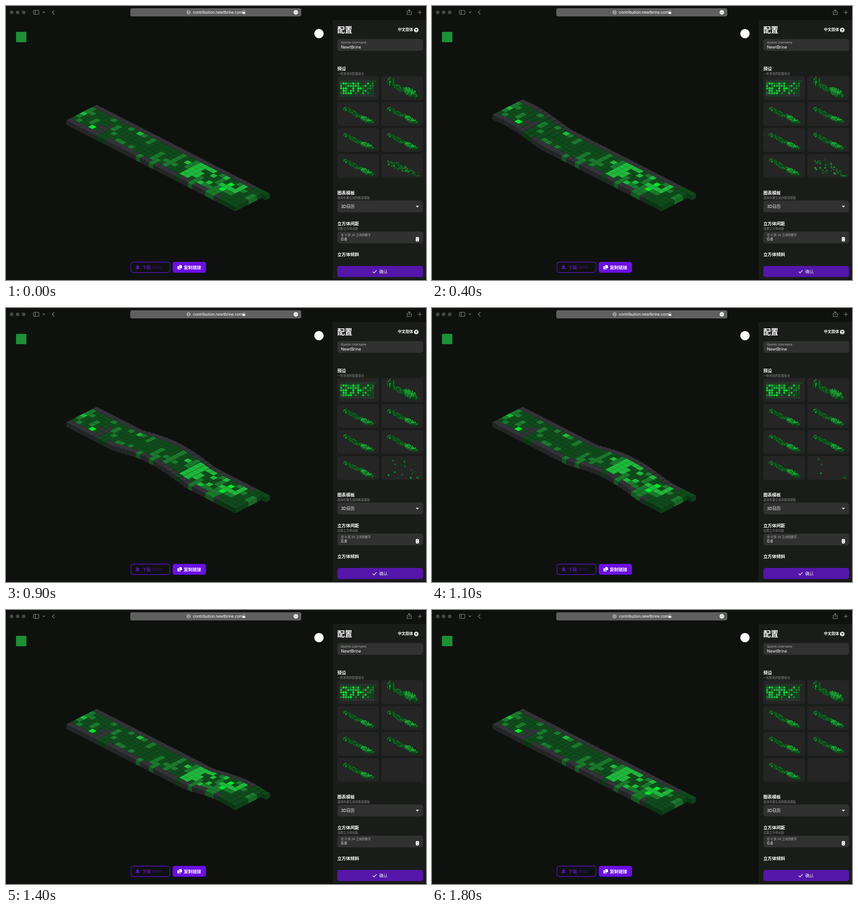
Animation, 926 px wide and 605 px high, one loop 1900 ms. Source, as an HTML page with a canvas:

```html
<!DOCTYPE html>
<html lang="zh">
<head>
<meta charset="utf-8">
<title>3D calendar</title>
<style>
  html, body { margin: 0; width: 926px; height: 605px; overflow: hidden; background: #0f110f; }
  svg, canvas { position: absolute; left: 0; top: 0; }
  text { font-family: Inter, "Noto Sans CJK SC", "Noto Sans CJK", sans-serif; font-size: 9px; fill: #fff; }
  .bold { font-size: 9.6px; font-weight: 700; }
  .note { font-size: 6.55px; fill: #8b8b8b; }
  .label { font-size: 6.6px; fill: #b4b4b4; }
  .field { fill: #303130; }
  .line { fill: none; stroke: #858685; stroke-width: 1.2; }
</style>
</head>
<body>
<svg width="926" height="605" viewBox="0 0 926 605">
  <!-- browser bar -->
  <g fill="#464746"><circle cx="12.5" cy="14" r="4"/><circle cx="25.7" cy="14" r="4"/><circle cx="39" cy="14" r="4"/></g>
  <g class="line">
    <rect x="60.5" y="9.5" width="12" height="9" rx="1.5"/><path d="M64.5 9.5v9M81 12.500l2.500 2.500 2.500-2.500M106.500 9.500l-4.500 4.500 4.500 4.500"/>
    <path d="M886.500 12h-2v7h9v-7h-2M889 16V8m-2.500 2.500L889 8l2.500 2.500M908 14h9m-4.500-4.500v9"/>
  </g>
  <rect x="274" y="5" width="377" height="18" rx="4" fill="#5e5f5e"/>
  <g fill="none" stroke="#ddd" stroke-width=".7">
    <circle cx="402.500" cy="14" r="4"/><ellipse cx="402.500" cy="14" rx="1.800" ry="4"/><path d="M398.500 14h8"/>
    <path d="M522.500 13v-1.500a2 2 0 0 1 4 0V13"/>
  </g>
  <text x="412" y="17.400" style="font-family:Roboto,sans-serif">contribution.newtbrine.com</text>
  <rect x="521.500" y="13" width="6" height="4.500" rx="1" fill="#eee"/>
  <circle cx="639" cy="14" r="5" fill="#eee"/>
  <path d="M636 14h6" stroke="#5e5f5e" stroke-width="1.200" stroke-dasharray="1.200"/>

  <rect x="22" y="57" width="23" height="23" rx="2" fill="#1d8f35"/>
  <circle cx="690" cy="61" r="10.300" fill="#fff"/>

  <!-- actions -->
  <rect x="275.500" y="565.500" width="86" height="23" rx="5" fill="none" stroke="#5b13c4" stroke-width="1.400"/>
  <path d="M290 572v5m-3-2.500l3 3 3-3M285.500 579.500h9" fill="none" stroke="#6415d6" stroke-width="2"/>
  <text class="bold" x="300.500" y="580.500" style="fill:#5815b8">下载</text>
  <text x="322" y="580" style="font-size:8px;fill:#451291">(SVG)</text>
  <rect x="367.500" y="565" width="73.500" height="24" rx="5" fill="#6b10e2"/>
  <path d="M382 572h4l2 2v5h-6zM378 574.500h3v5.500h4v1.500h-7z" fill="#fff"/>
  <text class="bold" x="392" y="580.500">复制链接</text>

  <!-- settings -->
  <path d="M720 31h206v572h-206z" fill="#1a1c1a"/>
  <text x="730.500" y="58.500" style="font-size:16.600px;font-weight:700">配置</text>
  <text x="864" y="55.300" style="font-size:8.300px;font-weight:600">中文简体</text>
  <circle cx="904.500" cy="53" r="5" fill="#fff"/>
  <path d="M902 51.500h4l-2 3v2" fill="none" stroke="#1a1c1a" stroke-width="1.300"/>
  <rect class="field" x="730.500" y="73" width="189" height="26" rx="5"/>
  <text class="label" x="738.500" y="83.200">Quenlo Username</text>
  <text x="738.500" y="94">NewtBrine</text>
  <text class="bold" x="730.500" y="141.600">预设</text>
  <text class="note" x="730.500" y="152">一些常用的配置组合</text>
  <text class="bold" x="730.500" y="415.700">图表模板</text>
  <text class="note" x="730.500" y="426">选择你要生成的图表模板</text>
  <rect class="field" x="730.500" y="429.500" width="189" height="26" rx="5"/>
  <text x="738.500" y="446">3D日历</text>
  <path d="M903.500 441h7l-3.500 4z" fill="#fff"/>
  <text class="bold" x="730.500" y="484">立方体间距</text>
  <text class="note" x="730.500" y="494.300">设置立方体间距</text>
  <rect class="field" x="730.500" y="498" width="189" height="26" rx="5"/>
  <text class="label" x="738.500" y="507.800">在 0 到 20 之间的数字</text>
  <text x="738.500" y="518.200">0.6</text>
  <rect x="903.500" y="510" width="7" height="10" rx="2" fill="#fff"/>
  <path d="M905.500 513.500l1.500-1.500 1.500 1.500m-3 3l1.500 1.500 1.500-1.500" fill="none" stroke="#303130"/>
  <text class="bold" x="730.500" y="552.300">立方体倾斜</text>
  <rect x="730.500" y="574" width="189" height="24.500" rx="5" fill="#5516aa"/>
  <path d="M808.500 586.500l3 3 5.500-6" fill="none" stroke="#eee" stroke-width="1.400"/>
  <text x="823" y="589.800" style="font-size:9.300px;fill:#f0f0f0">确认</text>
</svg>
<canvas id="stage" width="926" height="605"></canvas>
<script>
const ctx = document.getElementById('stage').getContext('2d');
const LOOP = 1900, TICK = 100, WEEKS = 40, DAYS = 7;
const DX = 9.55, DY = 4.9, DEPTH = 10;

const tones = [[51, 52, 56], [17, 74, 28], [27, 121, 46], [33, 184, 61], [3, 230, 47]];
const shades = tones.map(tone => [1, .72, .85].map(k => `rgb(${tone.map(v => v * k)})`));
const random = n => { const v = Math.sin(n * 12.9898) * 43758.5453; return v - Math.floor(v); };

// Runs of equal activity: [week, first day, number of days]
const runs = {
  0: [[5, 4, 1], [6, 3, 3]],
  1: [[7, 6, 1], [8, 6, 1], [25, 6, 1]],
  2: [[0, 1, 2], [0, 4, 1], [1, 2, 1], [1, 5, 1], [3, 3, 2], [5, 1, 1], [7, 2, 2], [8, 4, 1],
      [9, 1, 1], [10, 5, 1], [11, 5, 1], [12, 1, 1], [13, 5, 1], [14, 1, 2], [16, 6, 1],
      [18, 3, 3], [19, 5, 2], [20, 4, 1], [21, 1, 5], [22, 4, 1], [24, 1, 3], [28, 4, 3],
      [30, 1, 1], [30, 5, 1], [31, 2, 2], [31, 5, 1], [32, 4, 3], [33, 5, 2], [34, 1, 1],
      [34, 4, 1], [35, 4, 1], [36, 2, 1], [38, 2, 2]],
  3: [[0, 3, 1], [11, 1, 1], [23, 2, 1], [25, 1, 5], [26, 1, 5], [27, 1, 1], [27, 3, 2], [28, 1, 1],
      [29, 2, 1], [29, 5, 1], [30, 4, 1], [31, 1, 1], [32, 3, 1], [33, 3, 1], [34, 3, 1], [35, 1, 3]],
  4: [[4, 5, 1], [33, 2, 1], [33, 4, 1]]
};
const levels = Array.from({ length: WEEKS }, (_, week) => Array.from({ length: DAYS }, (_, day) =>
  (day === 0 && week < 37) || (day === 6 && week < 35) ? 0 : 1));
for (const level in runs)
  for (const [week, day, count] of runs[level]) levels[week].fill(+level, day, day + count);

function face(color, points) {
  ctx.fillStyle = color;
  ctx.beginPath();
  points.forEach(([x, y]) => ctx.lineTo(x, y));
  ctx.closePath();
  ctx.fill();
}

// x, y is the rear corner of the top face
function cube(x, y, scale, level, depth = DEPTH, seam = false) {
  const a = DX * scale, b = DY * scale, h = depth * scale;
  const [top, left, right] = shades[level];
  face(left, [[x - a, y + b], [x, y + 2 * b], [x, y + 2 * b + h], [x - a, y + b + h]]);
  face(right, [[x + a, y + b], [x, y + 2 * b], [x, y + 2 * b + h], [x + a, y + b + h]]);
  face(top, [[x, y], [x + a, y + b], [x, y + 2 * b], [x - a, y + b]]);
  if (seam) {
    ctx.strokeStyle = 'rgba(0,0,0,.16)';
    ctx.lineWidth = .6;
    ctx.stroke();
  }
}

// A bump that reaches each week 30 ms after the one before
function wave(week, t) {
  const u = (t - 340 - week * 30) / 260;
  return Math.abs(u) < 1 ? 13 * Math.cos(u * Math.PI / 2) ** 1.15 : 0;
}

function calendar(x, y, scale, lift, extra = () => 0) {
  for (let week = 0; week < WEEKS; week++)
    for (let day = 0; day < (week === WEEKS - 1 ? 1 : DAYS); day++) {
      const level = levels[week][day], grow = extra(week, day, level);
      if (scale < 1 && !level) continue;
      cube(x + (week - day) * DX * scale, y + ((week + day) * DY - lift(week) - grow) * scale,
        scale, level, DEPTH + grow, scale === 1);
    }
}

function flatPreset(x, y) {
  for (let col = 0; col < 15; col++)
    for (let row = 0; row < (col === 14 ? 1 : 7); row++) {
      const r = random(col * 7 + row + 3);
      const level = row === 0 || row === 6 ? (r < .6 ? 0 : 1)
        : col > 11 ? (r < .6 ? 1 : 2) : r < .25 ? 1 : r < .4 ? 2 : r < .75 ? 3 : 4;
      ctx.fillStyle = shades[level][0];
      ctx.beginPath();
      ctx.roundRect(x + col * 5.4, y + row * 5.35, 4.6, 4.6, 1);
      ctx.fill();
    }
}

function scatterPreset(x, y, t) {
  for (let i = 0; i < 95; i++) {
    const life = 1300 * random(i + 1), along = random(i + 201), spread = .25 + t / 1300;
    if (t >= life) continue;
    const px = 10 + 72 * along + (random(i + 401) - .5) * 34 * spread;
    const py = 13 + 32 * along + (random(i + 601) - .5) * 52 * spread;
    ctx.globalAlpha = Math.min(1, .35 + (life - t) / 250);
    cube(x + Math.max(4, Math.min(86, px)), y + Math.max(3, Math.min(46, py)),
      .21, 1 + Math.floor(random(i + 801) * 2.6));
  }
  ctx.globalAlpha = 1;
}

function presets(t) {
  for (let i = 0; i < 8; i++) {
    const x = i % 2 ? 827.5 : 730.5, y = 155 + 57.3 * (i >> 1);
    ctx.fillStyle = '#242524';
    ctx.beginPath();
    ctx.roundRect(x, y, 92, 52.500, 5);
    ctx.fill();
    if (i === 0) flatPreset(x + 6, y + 8.5);
    else if (i === 1) calendar(x + 20.5, y + 11, .166, () => 0,
      (week, day, level) => random(week * 7 + day) * (level * 22 + (week < 9 ? 28 : 0)));
    else if (i === 7) scatterPreset(x, y, t);
    else calendar(x + 20.5, y + 10.5, .168, week => wave(week, (t + i * 330) % LOOP) * .8,
      (week, day, level) => random(week * 7 + day) * level * 5);
  }
}

let shown = -1;
function frame(now) {
  const t = Math.floor(now % LOOP / TICK) * TICK;
  if (t !== shown) {
    shown = t;
    ctx.clearRect(0, 0, 926, 605);
    calendar(200, 218, 1, week => wave(week, t));
    presets(t);
  }
  requestAnimationFrame(frame);
}
frame(performance.now());
</script>
</body>
</html>
```
